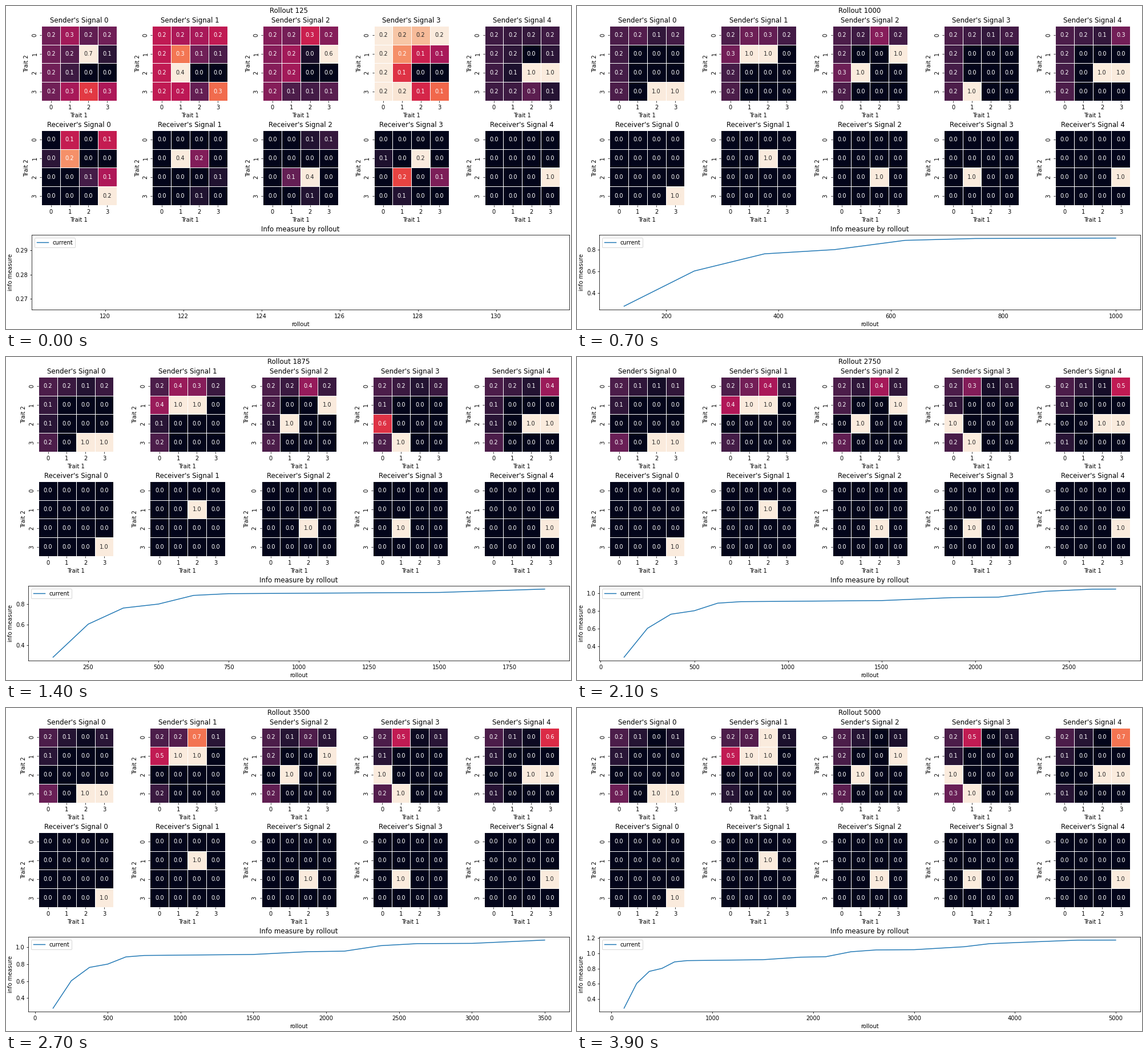
These frames come from a looping animation (990x566 px, 4 s). A matplotlib script:

```python
import numpy as np
import matplotlib.pyplot as plt
from matplotlib.animation import FuncAnimation
from matplotlib.colors import LinearSegmentedColormap

W, H, DPI = 990, 566, 70.75
FRAMES, INTERVAL, STEP = 40, 100, 125
SETTLED = 7  # by this step the clear-cut cells have been learned
SIDE, GAP, RIGHT = 131.3, 28.5, 987
TOPS = [34.7, 217.8, 400.7]

plt.rcParams["font.family"] = "DejaVu Sans"
ROCKET = LinearSegmentedColormap.from_list("warm", [
    "#03051a", "#221331", "#451c47", "#6a1f56", "#921c5b", "#b91657",
    "#d92847", "#ed503e", "#f47d57", "#f6a47c", "#f7c9aa", "#faebdd"])

# Corners of the info curve, rollout: value.
CORNERS = {125: .281, 250: .605, 375: .763, 500: .802, 625: .887, 750: .904,
           1500: .916, 1875: .949, 2125: .955, 2375: 1.02, 2625: 1.044,
           3000: 1.047, 3500: 1.086, 3750: 1.126, 4250: 1.153, 4625: 1.172,
           5000: 1.173}
ROLLOUTS = STEP * np.arange(1, FRAMES + 1)
INFO = np.interp(ROLLOUTS, list(CORNERS), list(CORNERS.values()))

# For each cell, the probability of the leading signals at a few steps;
# whatever is left over is shared evenly by the other signals.
SENDER = {
    (0, 0): {0: {}},
    (0, 1): {0: {0: .28}, 14: {1: .38}, 27: {1: .22, 3: .48}},
    (0, 2): {0: {2: .3}, 21: {1: .42, 2: .41}, 33: {1: 1}},
    (0, 3): {0: {}, 39: {4: .71}},
    (1, 0): {0: {}, 14: {1: .38, 2: .19}, 27: {1: .48, 2: .19}},
    (2, 0): {0: {}, SETTLED: {2: .28}, 14: {3: .57}, 18: {3: 1}},
    (3, 0): {0: {}, 14: {}, 21: {0: .27, 1: .18, 2: .25, 3: .19},
             39: {0: .28, 2: .24, 3: .27}},
    (1, 1): {0: {1: .3, 2: .24}, SETTLED: {1: 1}},
    (1, 2): {0: {0: .7, 1: .12, 3: .1}, SETTLED: {1: 1}},
    (1, 3): {0: {2: .6, 4: .15}, SETTLED: {2: 1}},
    (2, 1): {0: {1: .42, 2: .24}, SETTLED: {2: 1}},
    (2, 2): {0: {4: 1}},
    (2, 3): {0: {4: 1}},
    (3, 1): {0: {0: .29, 2: .12}, SETTLED: {3: 1}},
    (3, 2): {0: {0: .41, 4: .27}, SETTLED: {0: 1}},
    (3, 3): {0: {0: .3, 1: .29}, SETTLED: {0: 1}},
}

# For each signal, the same over the cells.
RECEIVER = [
    {0: {(0, 1): .11, (0, 3): .11, (1, 1): .16, (2, 2): .056, (2, 3): .1,
         (3, 3): .2, (1, 0): .045}, SETTLED: {(3, 3): 1}},
    {0: {(1, 1): .44, (1, 2): .16, (2, 3): .06, (3, 2): .06},
     SETTLED: {(1, 2): 1}},
    {0: {(2, 2): .44, (2, 1): .13, (0, 2): .06, (0, 3): .08, (3, 2): .06},
     SETTLED: {(2, 2): 1}},
    {0: {(1, 2): .24, (2, 1): .16, (2, 3): .1, (1, 0): .052, (3, 1): .055},
     SETTLED: {(2, 1): 1}},
    {0: {(2, 3): 1}},
]


def spread(lead, shape):
    """Probabilities that sum to one, given only the leading ones."""
    rest = 1 - sum(lead.values())
    shares = np.full(shape, rest / (np.prod(shape) - len(lead)))
    for key, value in lead.items():
        shares[key] = value
    return shares


def along(path, t, shape):
    """Straight blend between the two steps of `path` around t."""
    times = list(path)
    a = max(k for k in times if k <= t)
    b = min((k for k in times if k > t), default=a)
    start, end = spread(path[a], shape), spread(path[b], shape)
    return start + (end - start) * (t - a) / max(b - a, 1)


def clock(i):
    """Early learning keeps pace with the info curve, then runs evenly."""
    if i >= SETTLED:
        return i
    return SETTLED * (INFO[i] - INFO[0]) / (INFO[SETTLED] - INFO[0])


def grids_at(i):
    """The five sender grids followed by the five receiver grids."""
    t = clock(i)
    send = np.zeros((5, 4, 4))
    for (row, col), path in SENDER.items():
        send[:, row, col] = along(path, t, 5)
    return [*send, *(along(path, t, (4, 4)) for path in RECEIVER)]


def ink(color):
    """Dark text on light cells, white on dark ones."""
    rgb = np.asarray(color[:3])
    linear = np.where(rgb <= .03928, rgb / 12.92, ((rgb + .055) / 1.055) ** 2.4)
    return ".15" if linear @ [.2126, .7152, .0722] > .408 else "w"


def box(x, y, w, h):
    """Pixel box, measured from the top left, as figure fractions."""
    return [x / W, 1 - (y + h) / H, w / W, h / H]


class Heatmap:
    def __init__(self, fig, title, column, top):
        self.column, self.top = column, top
        self.ax = ax = fig.add_axes(box(60, top, SIDE, SIDE), label=title)
        self.mesh = ax.pcolormesh(np.zeros((4, 4)), cmap=ROCKET,
                                  edgecolors="w", linewidth=.75)
        ax.set(xlim=(0, 4), ylim=(4, 0), xlabel="Trait 1", ylabel="Trait 2")
        ax.set_title(title)
        ax.set_xticks(np.arange(4) + .5, range(4))
        ax.set_yticks(np.arange(4) + .5, range(4), rotation=90, va="center")
        ax.spines[:].set_visible(False)
        self.texts = [ax.text(c + .5, r + .5, "", ha="center", va="center")
                      for r in range(4) for c in range(4)]

    def update(self, grid, left):
        width = (RIGHT - left - 4 * GAP) / 5
        x = left + self.column * (width + GAP) + (width - SIDE) / 2
        self.ax.set_position(box(x, self.top, SIDE, SIDE))
        self.mesh.set_array(grid)
        self.mesh.set_clim(grid.min(), grid.max())
        for text, value in zip(self.texts, grid.flat):
            text.set_text(f"{value:.1f}")
            text.set_color(ink(self.mesh.to_rgba(value)))


fig = plt.figure(figsize=((W + 1e-4) / DPI, (H + 1e-4) / DPI), dpi=DPI,
                 facecolor="w")
heading = fig.suptitle("", y=1 - 1.6 / H, fontsize=12)
heatmaps = [Heatmap(fig, f"{role}'s Signal {n}", n, top)
            for role, top in zip(("Sender", "Receiver"), TOPS)
            for n in range(5)]

chart = fig.add_axes(box(45, TOPS[2], 942, SIDE), label="info")
line, = chart.plot([], [], color="tab:blue", label="current")
chart.set(xlabel="rollout", ylabel="info measure")
chart.set_title("Info measure by rollout")
chart.legend(loc="upper left")


def update(i):
    # The lone first point needs longer tick labels, so more room on the left.
    left = 45.2 if i == 0 else 39.4
    for heatmap, grid in zip(heatmaps, grids_at(i)):
        heatmap.update(grid, left)

    heading.set_text(f"Rollout {ROLLOUTS[i]}")
    chart.set_position(box(left, TOPS[2], RIGHT - left, SIDE))
    line.set_data(ROLLOUTS[:i + 1], INFO[:i + 1])
    chart.relim()
    chart.autoscale_view()
    return []


anim = FuncAnimation(fig, update, frames=FRAMES, interval=INTERVAL,
                     init_func=lambda: update(0), repeat=True, repeat_delay=0)
plt.show()
```
